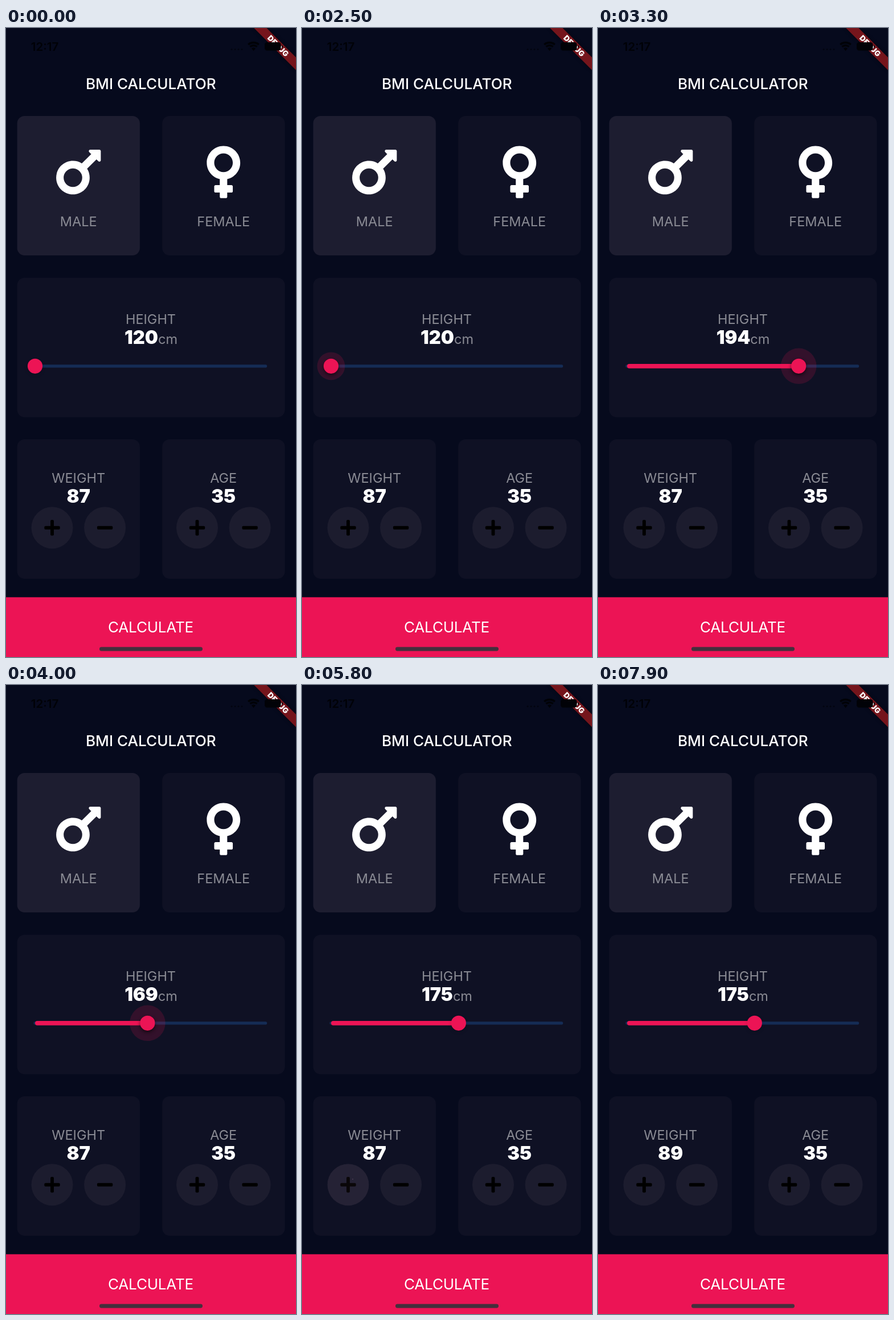
An HTML page that plays this animation: 509x1101 px, repeating every 8 s.

```html
<!DOCTYPE html>
<html lang="en">
<head>
<meta charset="utf-8">
<title>BMI Calculator</title>
<style>
  html, body { margin: 0; width: 100%; height: 100%; overflow: hidden; background: #060a1d; }
  svg { display: block; width: 100%; height: 100%; font-family: Inter, Roboto, sans-serif; }
  text { text-anchor: middle; }
  .card { fill: #0f1124; }
  .label { font-size: 23.5px; fill: #8a8b94; }
  .num { font-size: 32.6px; font-weight: 900; fill: #fff; }
  .btn { fill: #1c1c2e; }
</style>
</head>
<body>
<svg viewBox="0 0 509 1101" xmlns="http://www.w3.org/2000/svg">
  <defs>
    <filter id="soft" x="-50%" y="-50%" width="200%" height="200%"><feGaussianBlur stdDeviation="3"/></filter>
    <clipPath id="round"><circle cx="81" cy="874.8" r="36.5"/></clipPath>
    <rect id="bar" x="-13.7" y="-2.95" width="27.4" height="5.9" rx="2"/>
    <g id="minus"><circle class="btn" r="36.5"/><use href="#bar"/></g>
    <g id="plus"><use href="#minus"/><use href="#bar" transform="rotate(90)"/></g>
  </defs>

  <rect width="509" height="1101" fill="#060a1d"/>
  <text x="254.3" y="107" font-size="26.1" font-weight="500" fill="#fff">BMI CALCULATOR</text>

  <g id="cards"></g>

  <g fill="#fff">
    <path transform="translate(88.1 200) scale(.2039)" d="M372 64h-79c-10.7 0-16 12.9-8.5 20.4l16.9 16.9-80.7 80.7C198.5 167.1 172.2 160 144 160 64.5 160 0 224.5 0 304s64.5 144 144 144 144-64.5 144-144c0-28.2-8.1-54.5-22.1-76.7l80.7-80.7 16.9 16.9c7.6 7.6 20.4 2.2 20.4-8.5V76c0-6.6-5.4-12-12-12zM144 384c-44.1 0-80-35.9-80-80s35.9-80 80-80 80 35.9 80 80-35.9 80-80 80z"/>
    <path transform="translate(352.4 200) scale(.2039)" d="M288 176c0-79.5-64.5-144-144-144S0 96.5 0 176c0 68.5 47.9 125.9 112 140.4V368H76c-6.6 0-12 5.4-12 12v40c0 6.6 5.4 12 12 12h36v36c0 6.6 5.4 12 12 12h40c6.6 0 12-5.4 12-12v-36h36c6.6 0 12-5.4 12-12v-40c0-6.6-5.4-12-12-12h-36v-51.6c64.1-14.6 112-71.9 112-140.4zm-224 0c0-44.1 35.9-80 80-80s80 35.9 80 80-35.9 80-80 80-80-35.9-80-80z"/>
  </g>
  <g class="label">
    <text x="127.2" y="347">MALE</text>
    <text x="381.7" y="347">FEMALE</text>
    <text x="254" y="518">HEIGHT</text>
    <text x="127.2" y="796">WEIGHT</text>
    <text x="381.7" y="796">AGE</text>
  </g>

  <text x="254.5" y="553"><tspan id="height" class="num">120</tspan><tspan class="label">cm</tspan></text>
  <rect x="48.4" y="589.2" width="409.8" height="5.2" rx="2.6" fill="#152c55"/>
  <rect id="active" x="51" y="587.9" height="7.8" rx="3.9" fill="#ec1455"/>
  <g id="thumb">
    <circle id="halo" fill="#eb1555" fill-opacity=".16"/>
    <circle id="shade" cy="3" r="13" filter="url(#soft)"/>
    <circle r="13.1" fill="#ec1455"/>
  </g>

  <text id="weight" class="num" x="127.2" y="831">87</text>
  <text class="num" x="381.7" y="831">35</text>
  <use href="#plus" x="81" y="874.8"/>
  <use href="#minus" x="173.6" y="874.8"/>
  <use href="#plus" x="335.5" y="874.8"/>
  <use href="#minus" x="428.1" y="874.8"/>
  <g clip-path="url(#round)" fill="#d8a8c8">
    <circle id="glow" cx="81" cy="874.8" r="36.5"/>
    <circle id="splash" cx="89" cy="865"/>
  </g>

  <rect y="996.4" width="509" height="104.6" fill="#ec1455"/>
  <text x="254" y="1057.7" font-size="26.1" letter-spacing="-.25" fill="#fff">CALCULATE</text>
  <rect x="164" y="1083.6" width="181" height="6.8" rx="3.4" fill="#452f3c"/>

  <g transform="translate(509 0) rotate(45)">
    <rect x="-52.2" y="36.5" width="104.4" height="15.7" opacity=".5" filter="url(#soft)"/>
    <rect x="-53" y="36.5" width="106" height="15.7" fill="#75151c"/>
    <text y="49.1" font-size="13.3" font-weight="900" fill="#fff">DEBUG</text>
  </g>

  <g fill="#010207">
    <text x="68" y="40" font-size="20.5" font-weight="600">12:17</text>
    <g opacity=".6">
      <circle cx="396" cy="37.5" r="1.4"/><circle cx="402" cy="37.5" r="1.4"/>
      <circle cx="408" cy="37.5" r="1.4"/><circle cx="414" cy="37.5" r="1.4"/>
    </g>
    <path d="M434.5 40l-3.6-4.2a5.6 5.6 0 0 1 7.2 0z"/>
    <path d="M428.4 32.7a9.5 9.5 0 0 1 12.2 0M425.2 28.9a14.5 14.5 0 0 1 18.6 0" fill="none" stroke="#010207" stroke-width="3.3"/>
    <rect x="454" y="25" width="28.5" height="14.6" rx="4.4"/>
    <path d="M484 30v5q2-.8 2-2.5t-2-2.5z"/>
  </g>
</svg>
<script>
  const LOOP = 8000, STEP = 100;
  const $ = id => document.getElementById(id);
  const set = (id, attrs) => {
    for (const k in attrs) $(id).setAttribute(k, attrs[k]);
  };
  const linear = p => p;
  const smooth = p => p * p * (3 - 2 * p);

  // Value at time t along [time, value] keys.
  function track(keys, t, ease = linear) {
    if (t <= keys[0][0]) return keys[0][1];
    for (let i = 1; i < keys.length; i++) {
      const [t0, a] = keys[i - 1], [t1, b] = keys[i];
      if (t <= t1) return a + (b - a) * ease((t - t0) / (t1 - t0));
    }
    return keys[keys.length - 1][1];
  }

  const drag = [[2500, 120], [3300, 194], [4000, 168.5], [4200, 166.5], [4300, 166.5], [4700, 175]];
  const press = [[2400, 0], [2500, .78], [2600, 1], [4800, 1], [4900, .5], [5000, 0]];
  const glow = [[5700, 0], [5800, .045], [5900, .13], [6000, .09], [6100, .13], [6200, .07], [6300, 0]];

  const cards = [[19.6, 154, 215.3, 1], [274.2, 154, 215.3], [19.6, 437.2, 469.9], [19.6, 720, 215.3], [274.2, 720, 215.3]];
  $('cards').innerHTML = cards.map(([x, y, w, on]) =>
    `<rect class="card" x="${x}" y="${y}" width="${w}" height="244" rx="13"${on ? ' style="fill:#1d1d30"' : ''}/>`).join('');

  function draw(ms) {
    const t = Math.floor(ms / STEP) * STEP;
    const cm = track(drag, t, smooth);
    const x = 51 + (cm - 120) * 4.07;
    const p = track(press, t);
    $('height').textContent = Math.round(cm);
    set('active', { width: x - 51 });
    set('thumb', { transform: `translate(${x} 591.8)` });
    set('halo', { r: 31.3 * p });
    set('shade', { opacity: .15 + .45 * p });

    $('weight').textContent = t < 5900 ? 87 : t < 6100 ? 88 : 89;
    set('glow', { opacity: track(glow, t) });
    const tap = t < 5800 || t >= 6300 ? -1 : (t - 5800) % 300;
    set('splash', { r: tap < 0 ? 0 : 1 + tap * .18, opacity: tap < 0 ? 0 : .2 * (1 - tap / 300) });
  }

  const start = performance.now();
  function tick() {
    draw((performance.now() - start) % LOOP);
    requestAnimationFrame(tick);
  }
  tick();
</script>
</body>
</html>
```
